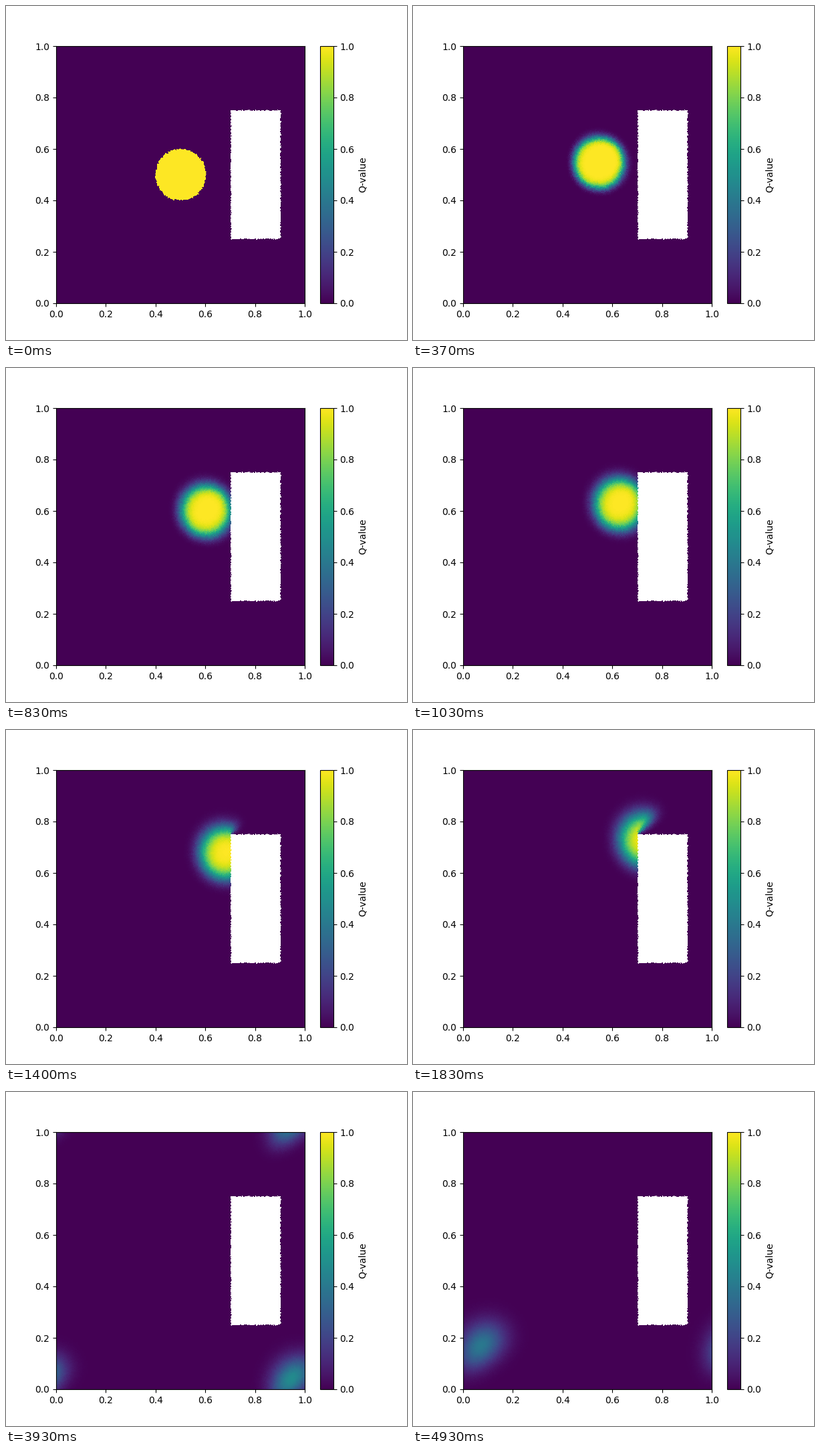
Recreate the animation shown at these times as a matplotlib script. Size 600 by 500 pixels, loop 5000 ms.

```python
import itertools

import numpy as np
import matplotlib.pyplot as plt
from matplotlib.animation import FuncAnimation

FRAMES, LOOP_MS = 150, 5000
N = 200                 # cells per side
SHIFT = 0.00424         # drift along x and y per frame
SUBSTEPS = 8
W, H = 372, 385         # axes size in pixels

rng = np.random.default_rng(4)

# One random site inside each grid square, arrays indexed [row, column]
col, row = np.meshgrid(np.arange(N), np.arange(N))
sx = (col + rng.random((N, N))) / N
sy = (row + rng.random((N, N))) / N

cx, cy = (col + 0.5) / N, (row + 0.5) / N
fluid = ~((cx > 0.7) & (cx < 0.9) & (cy > 0.25) & (cy < 0.75))


def nearest_sites():
    """Row and column of the closest site for every axes pixel."""
    x, y = np.meshgrid((np.arange(W) + 0.5) / W, (np.arange(H) + 0.5) / H)
    i0, j0 = (y * N).astype(int), (x * N).astype(int)
    best = np.full(x.shape, np.inf)
    bi, bj = i0.copy(), j0.copy()
    for di, dj in itertools.product(range(-2, 3), repeat=2):
        i, j = np.clip(i0 + di, 0, N - 1), np.clip(j0 + dj, 0, N - 1)
        d = (sx[i, j] - x) ** 2 + (sy[i, j] - y) ** 2
        closer = d < best
        best[closer] = d[closer]
        bi[closer], bj[closer] = i[closer], j[closer]
    return bi, bj


def simulate():
    """Upwind advection, periodic box, absorbing obstacle."""
    q = ((sx - 0.5) ** 2 + (sy - 0.5) ** 2 < 0.1 ** 2).astype(np.float32)
    c = np.float32(SHIFT * N / SUBSTEPS)
    states = []
    for _ in range(FRAMES):
        states.append(q)
        for _ in range(SUBSTEPS):
            inflow = np.roll(q, 1, 0) + np.roll(q, 1, 1)
            q = (q + c * (inflow - 2 * q)) * fluid
    return states


cells = nearest_sites()
hole = ~fluid[cells]
states = simulate()


def picture(k):
    return np.ma.array(states[k][cells], mask=hole)


fig, ax = plt.subplots(figsize=(6, 5), dpi=100)
im = ax.imshow(picture(0), origin="lower", extent=(0, 1, 0, 1), aspect="auto",
               interpolation="nearest", cmap="viridis", vmin=0, vmax=1)
fig.colorbar(im, ax=ax, label="Q-value")


def update(k):
    im.set_data(picture(k))
    return (im,)


anim = FuncAnimation(fig, update, frames=FRAMES, interval=LOOP_MS / FRAMES,
                     repeat=True, repeat_delay=0)
plt.show()
```
